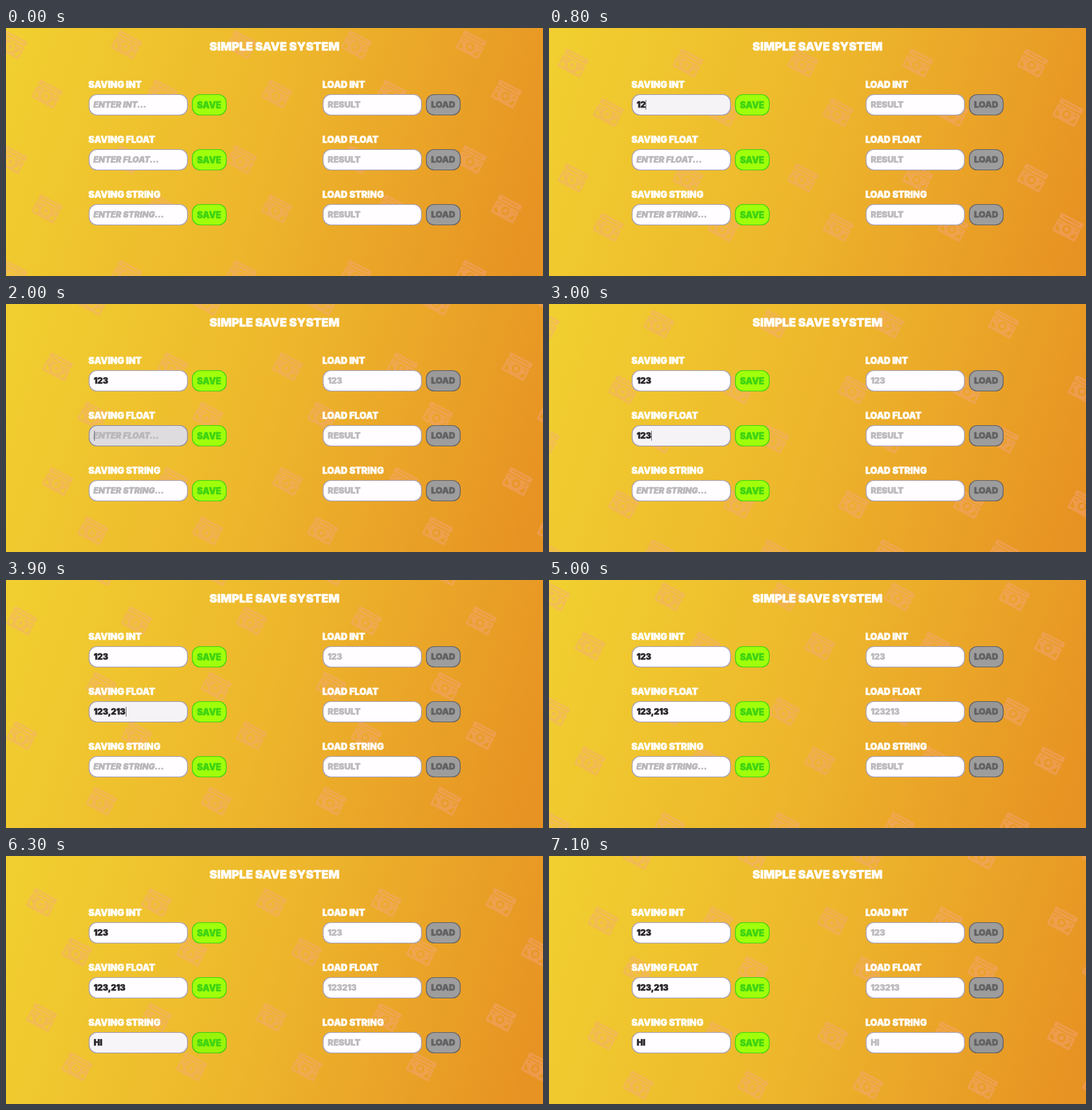
Write an HTML page with a canvas that moves like this. It is 762 px wide and 352 px high and loops after 7200 ms.

```html
<!DOCTYPE html>
<html lang="en">
<head>
<meta charset="utf-8">
<title>Simple save system</title>
<style>
  html, body { margin: 0; width: 100%; height: 100%; overflow: hidden; }
  canvas { display: block; }
</style>
</head>
<body>
<canvas id="stage" width="762" height="352"></canvas>
<script>
const ctx = document.getElementById('stage').getContext('2d');
const W = 762, H = 352;
const LOOP = 7200, STEP = 100;
const TILE = 163, TILE_TIME = 5000;

const rows = [
  { name: 'INT', y: 109, keys: [[400, '1'], [800, '2'], [1000, '3']], result: '123' },
  { name: 'FLOAT', y: 187, result: '123213',
    keys: [[2600, '1'], [2800, '2'], [3000, '3'], [3300, ','], [3500, '2'], [3700, '1'], [3800, '3']] },
  { name: 'STRING', y: 265, keys: [[5700, 'H'], [5900, 'I']], result: 'HI' }
];

// Clicks in order: time, widget, row
const clicks = [
  [140, 'field', 0], [1250, 'save', 0], [1700, 'load', 0],
  [1940, 'field', 1], [4150, 'save', 1], [4700, 'load', 1],
  [5250, 'field', 2], [6280, 'save', 2], [6850, 'load', 2]
];

const clamp = v => Math.max(0, Math.min(1, v));
const mix = (a, b, k) => a + (b - a) * clamp(k);

const sky = ctx.createLinearGradient(0, 60, 740, 300);
sky.addColorStop(0, '#f1cf30');
sky.addColorStop(0.5, '#edb62c');
sky.addColorStop(1, '#e79323');

const chest = new Path2D();
chest.roundRect(-18, -14.5, 36, 8, 2);
chest.rect(-13, -11.5, 26, 1.5);
chest.roundRect(-18, -5, 36, 19, 2);
chest.rect(-15, -2, 5, 1.5);
chest.rect(10, -2, 5, 1.5);
chest.moveTo(-15, 2); chest.lineTo(-8, 10.5); chest.lineTo(-15, 10.5); chest.closePath();
chest.moveTo(15, 2); chest.lineTo(8, 10.5); chest.lineTo(15, 10.5); chest.closePath();
chest.moveTo(6, 3); chest.arc(0, 3, 6, 0, Math.PI * 2);
chest.moveTo(3.5, 3); chest.arc(0, 3, 3.5, 0, Math.PI * 2);

function drawPattern(t) {
  const shift = t / TILE_TIME * TILE % TILE;
  ctx.fillStyle = 'rgba(245,165,135,.4)';
  for (const [ox, oy] of [[8, 24], [58, 94]])
    for (let x = ox + shift - TILE; x < W + 30; x += TILE)
      for (let y = oy + shift - TILE; y < H + 30; y += TILE) {
        ctx.save();
        ctx.translate(x, y);
        ctx.rotate(0.49);
        ctx.fill(chest, 'evenodd');
        ctx.restore();
      }
}

function text(str, x, cy, size, color, align = 'left', style = '') {
  ctx.font = `${style} 900 ${size}px Inter, sans-serif`;
  ctx.textAlign = align;
  ctx.lineJoin = 'round';
  ctx.lineWidth = 0.5;
  ctx.fillStyle = ctx.strokeStyle = color;
  const base = cy + size * 0.363;
  ctx.fillText(str, x, base);
  ctx.strokeText(str, x, base);
  return ctx.measureText(str).width;
}

// Brightness of a widget: dips when pressed, stays slightly dim while selected
function tint(t, kind, row) {
  const i = clicks.findIndex(c => c[1] === kind && c[2] === row);
  const age = t - clicks[i][0];
  if (age < 0) return 1;
  const held = age < 150 ? mix(1, 0.784, age / 100) : mix(0.784, 0.96, (age - 150) / 100);
  const next = clicks[i + 1];
  return next ? mix(held, 1, (t - next[0]) / 100) : held;
}

const shade = (rgb, k) => `rgb(${rgb.map(v => Math.round(v * k))})`;

function box(x, cy, w, fill, border, k) {
  ctx.beginPath();
  ctx.roundRect(x, cy - 14.5, w, 29, 11);
  ctx.fillStyle = shade(fill, k);
  ctx.fill();
  ctx.lineWidth = 1.2;
  ctx.strokeStyle = shade(border, k);
  ctx.stroke();
}

function field(x, cy, k) {
  box(x, cy, 139.5, [255, 253, 255], [166, 160, 184], k);
}

function isFocused(t, row) {
  const last = clicks.filter(c => c[0] <= t).pop();
  return !!last && last[1] === 'field' && last[2] === row;
}

function drawRow(row, i, t) {
  const { name, y } = row;
  text('SAVING ' + name, 117, y - 28.5, 12.8, '#fff');
  text('LOAD ' + name, 449, y - 28.5, 12.8, '#fff');

  field(118, y, tint(t, 'field', i));
  const typed = row.keys.filter(k => k[0] <= t).map(k => k[1]).join('');
  let caret = 124.5;
  if (typed) caret += text(typed, 124.5, y, 11.6, '#29262b');
  else text(`ENTER ${name}...`, 124, y, 11.8, '#b9b7ba', 'left', 'italic');
  if (isFocused(t, i)) {
    ctx.fillStyle = '#77747a';
    ctx.fillRect(Math.round(caret), y - 7, 1, 14);
  }
  box(264.5, y, 48, [160, 255, 10], [66, 212, 20], tint(t, 'save', i));
  text('SAVE', 288.3, y, 12.5, '#3fd313', 'center');

  field(450, y, 1);
  const loaded = t >= clicks[i * 3 + 2][0] + 100;
  text(loaded ? row.result : 'RESULT', 456.5, y, loaded ? 11.6 : 12.2, '#bcbabd');
  box(596.5, y, 48, [157, 157, 157], [98, 98, 104], tint(t, 'load', i));
  text('LOAD', 620.3, y, 12.3, '#626264', 'center');
}

function draw(now) {
  const t = Math.floor(now % LOOP / STEP) * STEP;
  ctx.fillStyle = sky;
  ctx.fillRect(0, 0, W, H);
  drawPattern(t);
  text('SIMPLE SAVE SYSTEM', 381, 26, 16.4, '#fff', 'center');
  rows.forEach((row, i) => drawRow(row, i, t));
}

let start;
function tick(now) {
  start ??= now;
  draw(now - start);
  requestAnimationFrame(tick);
}
draw(0);
requestAnimationFrame(tick);
</script>
</body>
</html>
```
